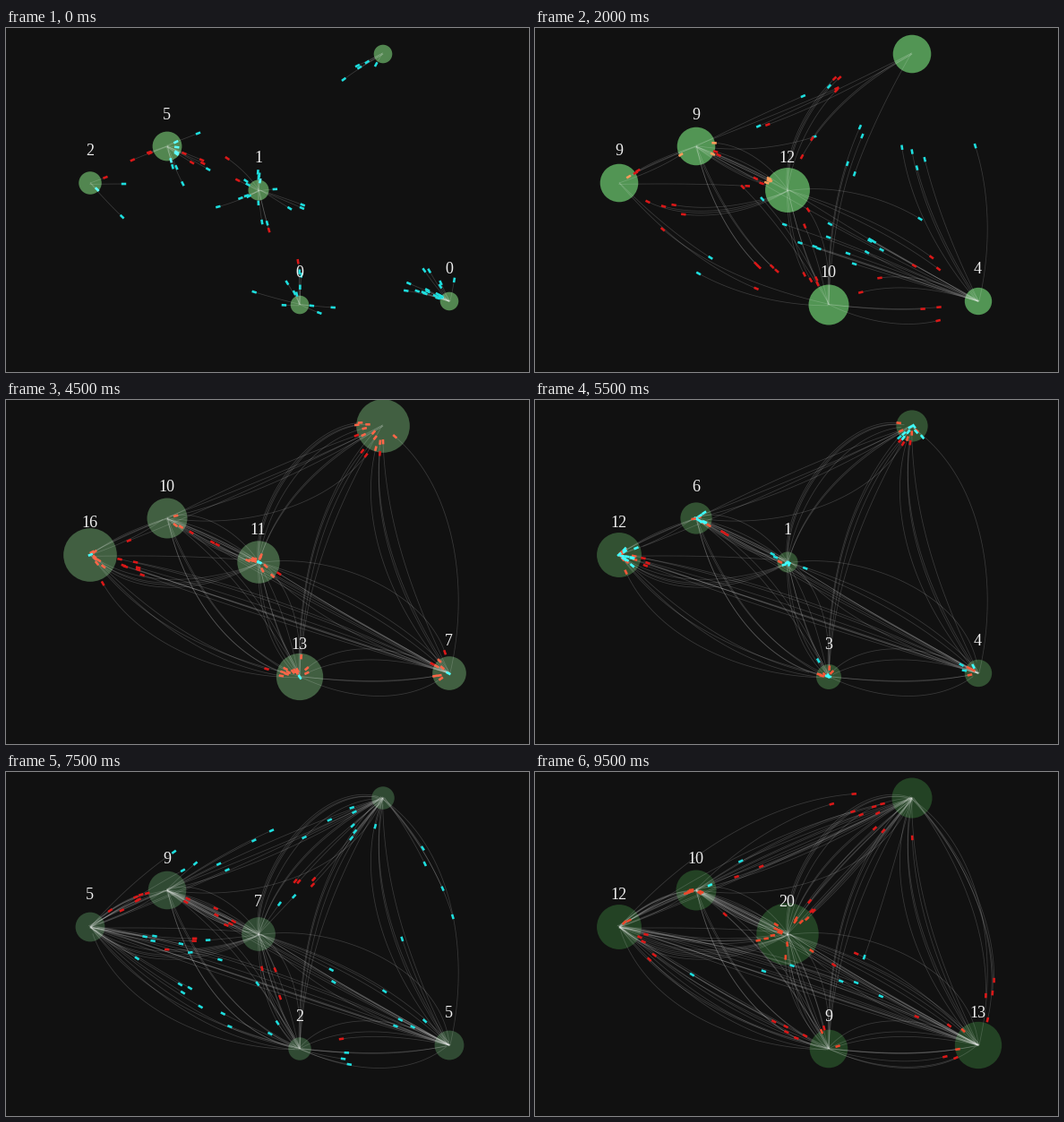
A matplotlib script that plays this animation: 584x384 px, repeating every 10000 ms.

```python
import numpy as np
import matplotlib.pyplot as plt
from matplotlib.animation import FuncAnimation
from matplotlib.collections import LineCollection
from matplotlib.patches import Circle

W, H, DPI = 584, 384, 100
FRAMES, INTERVAL = 20, 500
PX = 72 / DPI
DT = 0.05
RED_RANGE = 94

rng = np.random.default_rng(12)

HUBS = {"A": (421, 29), "B": (180, 132), "C": (94, 173),
        "D": (282, 181), "E": (328, 309), "F": (495, 305)}

# Cars near each hub over time, in seconds
COUNT_TIMES = [0, 1, 2, 3, 3.5, 4.5, 5, 5.5, 6.5, 7.5, 8.5, 9.5]
COUNTS = {
    "A": [0, 0, 9, 15, 15, 16, 13, 6, 0, 2, 5, 10],
    "B": [5, 7, 9, 10, 11, 10, 8, 6, 6, 9, 9, 10],
    "C": [2, 5, 9, 11, 17, 16, 12, 12, 5, 5, 9, 12],
    "D": [1, 7, 12, 13, 13, 11, 6, 1, 2, 7, 15, 20],
    "E": [0, 5, 10, 13, 13, 13, 10, 3, 0, 2, 6, 9],
    "F": [0, 2, 4, 7, 8, 7, 6, 4, 0, 5, 10, 13],
}

GLOW_TIMES = [0, 2, 3.5, 4.5, 5.5, 7.5, 9.5]
GLOW = [(82, 134, 80), (82, 149, 84), (67, 99, 67), (65, 95, 65),
        (50, 81, 50), (48, 74, 51), (35, 66, 36)]

# Route, number of cars, starting angle away from the straight line
FIRST_WAVE = [
    ("FC", 7, 2), ("DC", 4, -27), ("BC", 3, 0), ("EC", 2, -30), ("AC", 1, 0),
    ("DA", 4, -40), ("EA", 3, -16), ("BA", 2, 0), ("BA", 1, 32),
    ("FA", 4, -18), ("FA", 1, 33),
    ("DB", 4, 0), ("FB", 3, 0), ("AB", 1, 0), ("EB", 2, 14), ("CB", 1, 5),
    ("BD", 6, 0), ("AD", 2, 12), ("ED", 2, 20), ("FD", 2, -5), ("CD", 1, -8),
    ("BE", 4, 25), ("DE", 4, 12), ("CE", 2, 8), ("FE", 2, 25), ("AE", 1, 5),
    ("DF", 1, -35), ("DF", 3, -6), ("EF", 3, 18), ("BF", 1, 5),
]
SECOND_WAVE = [
    ("AD", 7, 3), ("BD", 5, 0), ("CD", 3, 12), ("ED", 2, -12), ("FD", 3, 4),
    ("CB", 5, 0), ("AB", 2, 0), ("DB", 2, 5), ("EB", 1, 10),
    ("BC", 2, 0), ("DC", 3, -15), ("EC", 3, -10), ("FC", 2, 3), ("AC", 2, 3),
    ("CE", 5, 5), ("DE", 2, 10), ("AE", 1, -8), ("FE", 1, 12),
    ("AF", 4, -25), ("DF", 2, -14), ("CF", 4, -4), ("EF", 3, 8),
    ("BA", 2, -18), ("BA", 2, 0), ("CA", 2, -16), ("CA", 1, 0),
    ("DA", 2, -5), ("FA", 1, -8),
]

BACKDROP = np.full(3, 17) / 255
CYAN = np.array([30, 222, 222]) / 255
RED = np.array([218, 24, 24]) / 255


def heading(angle):
    return np.array([np.cos(angle), np.sin(angle)])


def travel(length, start, gain):
    """Distance covered at each frame: speed up, cruise, ease into the hub."""
    done = speed = 0.0
    result = []
    for step in range(-40, (FRAMES - 1) * 10 + 1):
        if step * DT >= start:
            speed = min(speed + 35 * DT, 112, gain * (length - done))
            done += speed * DT
        if step >= 0 and step % 10 == 0:
            result.append(done)
    return result


class Car:
    def __init__(self, route, angle, start, leave):
        a = np.array(HUBS[route[0]]) + rng.normal(0, 0.6, 2)
        b = np.array(HUBS[route[1]]) + rng.normal(0, 1.2, 2)
        span = np.hypot(*(b - a))
        chord = np.arctan2(*(b - a)[::-1])
        turn = np.radians(angle + rng.normal(0, np.clip(1300 / span, 4, 11)))
        p1 = a + 0.35 * span * heading(chord + turn)
        p2 = b - 0.35 * span * heading(chord - 1.4 * turn)
        u = np.linspace(0, 1, 70)[:, None]
        self.path = ((1 - u) ** 3 * a + 3 * u * (1 - u) ** 2 * p1
                     + 3 * u ** 2 * (1 - u) * p2 + u ** 3 * b)
        steps = np.hypot(*np.diff(self.path, axis=0).T)
        self.along = np.concatenate([[0], np.cumsum(steps)])
        self.length = self.along[-1]
        self.goal = np.array(HUBS[route[1]])
        self.start, self.leave = start, leave
        self.done = travel(self.length, start, rng.uniform(0.5, 0.8))

    def at(self, distance):
        return np.array([np.interp(distance, self.along, self.path[:, k])
                         for k in (0, 1)])

    def trail(self, frame):
        d = self.done[frame]
        return np.vstack([self.path[self.along < d], self.at(d)])

    def visible(self, frame):
        t = frame * INTERVAL / 1000
        parked = t > 4 and self.length - self.done[frame] < 5
        return self.start <= t < self.leave and not (parked and self.leave < 10)

    def dash(self, frame):
        d = self.done[frame]
        mid = np.clip(d, 3, self.length - 3)
        way = self.at(mid + 3) - self.at(mid - 3)
        way *= 2.7 / np.hypot(*way)
        spot = self.at(d)
        color = RED if np.hypot(*(spot - self.goal)) < RED_RANGE else CYAN
        return spot, np.array([spot - way, spot + way]), color


def launch(wave, starts, leaves):
    return [Car(route, angle, rng.uniform(*starts), rng.uniform(*leaves))
            for route, n, angle in wave for _ in range(n)]


cars = (launch(FIRST_WAVE, (-1.7, -0.7), (5.0, 6.3))
        + launch(SECOND_WAVE, (4.4, 6.2), (20, 21)))

fig = plt.figure(figsize=(W / DPI, H / DPI), dpi=DPI, facecolor=BACKDROP)
ax = fig.add_axes([0, 0, 1, 1])
ax.set_xlim(0, W)
ax.set_ylim(H, 0)
ax.axis("off")

discs, labels = {}, {}
for name, (x, y) in HUBS.items():
    discs[name] = ax.add_patch(Circle((x, y), 10, lw=0, zorder=1))
    labels[name] = ax.text(x - 0.5, y - 30.5, "", color="#f0f0f0", ha="center",
                           va="baseline", family="Liberation Serif",
                           size=18 * PX, zorder=4)
labels["A"].set_visible(False)

trails = ax.add_collection(LineCollection(
    [], colors=[(1, 1, 1, 0.17)], linewidths=0.8 * PX, zorder=2))
dashes = ax.add_collection(LineCollection(
    [], linewidths=2.6 * PX, capstyle="butt", zorder=3))


def draw(frame):
    t = frame * INTERVAL / 1000
    glow = np.array([np.interp(t, GLOW_TIMES, c) for c in zip(*GLOW)]) / 255
    for name, disc in discs.items():
        count = int(round(np.interp(t, COUNT_TIMES, COUNTS[name])))
        disc.set_radius(10.3 + 1.22 * count)
        disc.set_facecolor(glow)
        labels[name].set_text(str(count))

    trails.set_segments([car.trail(frame) for car in cars
                         if car.done[frame] > 0])
    segments, colors = [], []
    for car in cars:
        if not car.visible(frame):
            continue
        spot, segment, color = car.dash(frame)
        # Light adds up where a car crosses a disc
        if any(np.hypot(*(spot - d.center)) < d.radius for d in discs.values()):
            color = np.minimum(color + glow - BACKDROP, 1)
        segments.append(segment)
        colors.append(color)
    dashes.set_segments(segments)
    dashes.set_color(colors)
    return [*discs.values(), trails, dashes, *labels.values()]


anim = FuncAnimation(fig, draw, frames=FRAMES, interval=INTERVAL,
                     repeat=True, repeat_delay=0, blit=False)
plt.show()
```
